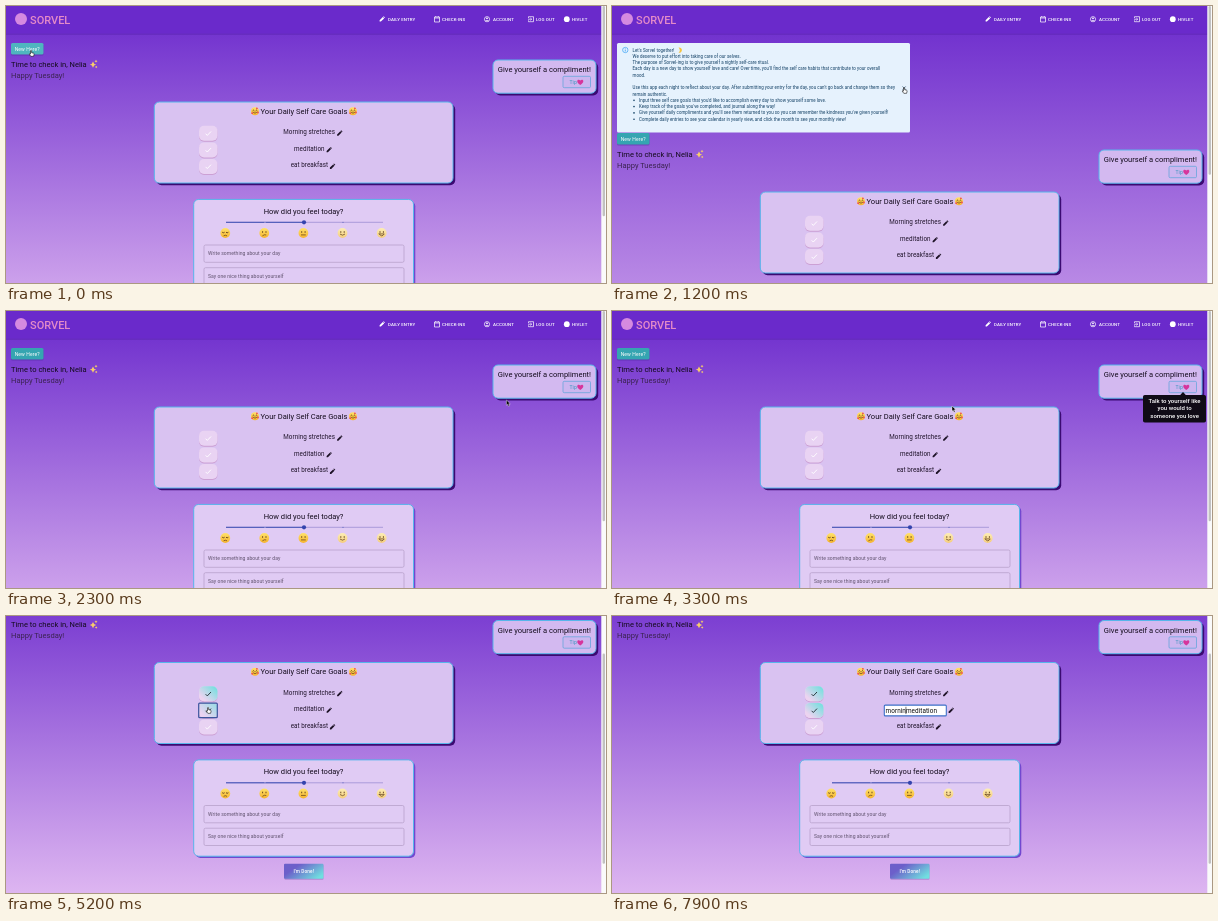
Recreate the animation shown at these times as an HTML page. Size 600x277 px, loop 8000 ms.

```html
<!DOCTYPE html>
<html lang="en">
<head>
<meta charset="utf-8">
<title>Self care check-in</title>
<style>
  html, body { margin: 0; width: 100%; height: 100%; overflow: hidden; background: #8a48d6; }
  svg { display: block; width: 100vw; height: 100vh; font-family: Roboto, Arial, sans-serif; }
</style>
</head>
<body>
<svg id="stage" viewBox="0 0 600 277"></svg>
<script>
const LOOP = 8000, PUSH = 90, SCROLL = 49.5, PAGE = 365;

// ---------- drawing helpers ----------
const text = (x, y, s, size, fill = '#17101f', more = '') =>
  `<text x="${x}" y="${y}" font-size="${size}" fill="${fill}" ${more}>${s}</text>`;
const rect = (x, y, w, h, r, fill, more = '') =>
  `<rect x="${x}" y="${y}" width="${w}" height="${h}" rx="${r}" fill="${fill}" ${more}/>`;
const circle = (x, y, r, fill, more = '') =>
  `<circle cx="${x}" cy="${y}" r="${r}" fill="${fill}" ${more}/>`;
const line = (d, color, width = .7, more = '') =>
  `<path d="${d}" fill="none" stroke="${color}" stroke-width="${width}" ${more}/>`;
const group = (id, body, x = 0, y = 0) =>
  `<g ${id ? `id="${id}"` : ''} transform="translate(${x} ${y})">${body}</g>`;
const at = (x, y, body) => group('', body, x, y);
const gradient = (id, from, to, dir) =>
  `<linearGradient id="${id}" ${dir}><stop stop-color="${from}"/><stop offset="1" stop-color="${to}"/></linearGradient>`;
const card = (x, y, w, h, fill, shadow, d) =>
  rect(x + d, y + d, w, h, 5, shadow) +
  rect(x, y, w, h, 5, fill, 'stroke="#57b5ea" stroke-width="1"');

const middle = 'text-anchor="middle"', medium = 'font-weight="500"';
const caps = 'font-weight="500" letter-spacing=".12"';
const pencil = color =>
  `<path d="M-2.400 2.400v-1.300l3.200-3.200 1.300 1.300-3.200 3.200zM1.100-2.400l.6-.6 1.300 1.300-.6.6z" fill="${color}"/>`;
const heart = '<path d="M0 2.800C-5.500-1-2.300-4-0-1.800 2.300-4 5.500-1 0 2.800z" fill="#d6359c"/>';
const spark = (x, y, r) =>
  `<path d="M${x} ${y - r}q${r * .2} ${r * .8} ${r} ${r}q${-r * .8} ${r * .2} ${-r} ${r}q${-r * .2} ${-r * .8} ${-r} ${-r}q${r * .8} ${-r * .2} ${r} ${-r}z" fill="#f8cd6a"/>`;

const ink = '#5b3a18';
const face = (x, y, r, eyes, mouth, skin = 'skin') => at(x, y,
  circle(0, 0, r, `url(#${skin})`) + line(eyes, ink, .9, 'stroke-linecap="round"') +
  line(mouth, ink, .7, 'stroke-linecap="round"'));
const dots = 'M-1.700-1.400v.8M1.700-1.400v.8';
const shut = 'M-2.800-.5q.9.800 1.800 0M1-.5q.9.800 1.800 0';
const love = (x, y) => face(x, y, 4, 'M-2.200-.6q.7-1.200 1.400 0M.8-.6q.7-1.200 1.400 0', 'M-1.600 1.300q1.600 1.600 3.200 0') +
  [[-2.8, 2], [2.9, 1.2], [1.9, -2.9]].map(([a, b]) => circle(x + a, y + b, .9, '#ee4c55')).join('');

// ---------- page parts ----------
const nav = rect(0, 27, 596, 2, 0, '#4b1a9c', 'opacity=".3"') + rect(0, 0, 596, 27.5, 0, '#6a2acb') +
  circle(15, 13, 6, '#d58ae0') + text(24, 17.5, 'SORVEL', 11, '#e58bc8', medium) +
  [[382, 'DAILY ENTRY'], [436, 'CHECK-INS'], [487, 'ACCOUNT'], [530, 'LOG OUT'], [566, 'HIVLET']]
    .map(([x, s]) => text(x, 14.7, s, 4.4, '#fff', caps)).join('') +
  at(376, 13.2, pencil('#fff')) +
  line('M428.500 11h5v5h-5zM428.500 12h5M429.700 10v1M432.300 10v1', '#fff') +
  circle(481, 13.2, 2.6, 'none', 'stroke="#fff" stroke-width=".7"') + circle(481, 12.3, .9, '#fff') +
  line('M479.300 15q1.700-1.400 3.400 0', '#fff') +
  line('M522.500 12v-1.300h5v5h-5v-1.300M522 13.200h3.600M524.400 12l1.300 1.200-1.300 1.200', '#fff') +
  circle(560.8, 13.2, 2.9, '#fff');

const notes = [
  "Let's Sorvel together!",
  'We deserve to put effort into taking care of our selves.',
  'The purpose of Sorvel-ing is to give yourself a nightly self-care ritual.',
  'Each day is a new day to show yourself love and care! Over time, you\'ll find the self care habits that contribute to your overall',
  'mood.', '',
  "Use this app each night to reflect about your day. After submitting your entry for the day, you can't go back and change them so they",
  'remain authentic.',
  "• Input three self care goals that you'd like to accomplish every day to show yourself some love.",
  "• Keep track of the goals you've completed, and journal along the way!",
  "• Give yourself daily compliments and you'll see them returned to you so you can remember the kindness you've given yourself!",
  '• Complete daily entries to see your calendar in yearly view, and click the month to see your monthly view!'
];
const noteLine = (s, i) => {
  const y = 45.6 + i * 6.28;
  return s[0] === '•'
    ? circle(22, y - 1.5, .8, '#0d3c61') + text(27, y, s.slice(2), 4.41, '#0d3c61', 'letter-spacing=".047"')
    : text(20.5, y, s, 4.41, '#0d3c61', 'letter-spacing=".047"');
};
const alertBox = rect(5, 37, 293, 89.5, 1.5, '#e6f2fd') + notes.map(noteLine).join('') +
  circle(13.3, 44, 2.7, 'none', 'stroke="#2196f3" stroke-width=".6"') +
  line('M13.300 43.500v2M13.300 42.300v.6', '#2196f3') +
  '<path d="M66.500 41.500a2.700 2.700 0 1 1 0 5.200q2.700-2 0-5.200z" fill="#f5c443"/>' +
  line('M290.600 80.500l3 3m0-3l-3 3', '#0d3c61');

const rows = [[277.3, 333.5, 'Morning stretches'], [288, 323, 'meditation'], [284.7, 326.3, 'eat breakfast']];
const goalRow = ([x, px, s], i) => {
  const y = 127.3 + i * 16.6;
  return rect(193, y - 6.5, 18.5, 15, 5, '#b5629f', 'opacity=".35"') +
    rect(193, y - 7.5, 18.5, 15, 5, '#e9d3f3', `id="box${i}"`) +
    rect(193, y - 7.5, 18.5, 15, 5, 'url(#done)', `id="fill${i}"`) +
    line(`M199.600 ${y + .4}l1.700 1.700 3.700-3.900`, '#fff', .9, `id="tick${i}"`) +
    group('row' + i, text(x, y + .8, s, 6.3, '#21152c', 'letter-spacing=".047"') + at(px, y, pencil('#1d1226')));
};

const field = (y, s) => rect(198, y, 200, 17.3, 1.5, 'none', 'stroke="#b39dc6" stroke-width=".7"') +
  text(202, y + 10.2, s, 5.04, '#5f516d', 'letter-spacing=".047"');

const content =
  rect(5, 38, 32.5, 11.5, 1.5, '#42208c', 'opacity=".4"') +
  rect(5, 37, 32.5, 11.5, 1.5, '#35a5b1', 'id="help"') +
  text(21.2, 44.6, 'New Here?', 5, '#fff', middle + ' letter-spacing=".1"') +
  text(5, 60.5, 'Time to check in, Nelia', 7.55, '#130b1c') + spark(87, 58.6, 3.2) + spark(90, 55.3, 1.5) + spark(90.2, 61, 1.3) +
  text(5, 71.7, 'Happy Tuesday!', 7.55, '#3b2351') +

  card(487, 54, 103, 33.2, '#d3b9f0', '#3b0a72', 2.2) +
  text(585, 66, 'Give yourself a compliment!', 7.55, '#130b1c', 'text-anchor="end"') +
  rect(557, 70.3, 27.5, 11.4, 1.2, '#ccb6ef', 'id="tip" stroke="#5aa4d8" stroke-width=".7"') +
  text(563.5, 77.8, 'Tip', 5.04, '#3a94bd', 'letter-spacing=".1"') + at(574.3, 76.2, heart) +

  card(148.3, 96, 298.7, 81, '#d9c2f1', '#3b0a72', 2.2) +
  love(249, 105.2) + love(347, 105.2) +
  text(298, 107.6, 'Your Daily Self Care Goals', 7.55, '#130b1c', middle) + rows.map(goalRow).join('') +
  rect(192.7, 136.6, 18.6, 14.6, 1, 'none', 'id="focus" stroke="#3b559c" stroke-width="1.2"') +
  group('edit', rect(272.3, 138.6, 62, 10.8, 1, '#fff', 'stroke="#3d6fc8" stroke-width="1.1"') +
    '<text y="146.200" x="273.600" font-size="6.400" fill="#111" letter-spacing=".05"><tspan id="typed"></tspan><tspan>meditation</tspan></text>' +
    line('M0 140.300v7.300', '#111', .6, 'id="caret"') + at(339, 144, pencil('#1d1226'))) +

  card(187.7, 193.4, 219.8, 96.3, '#e0cbf4', '#7248cf', 1.8) +
  text(297.5, 207.5, 'How did you feel today?', 7.55, '#130b1c', middle) +
  line('M220 216.300H377', '#9d8fd4', .8) + line('M220 216.300H298', '#3f51b5', 1) +
  circle(259, 216.3, .5, '#dfcaf4') + circle(337, 216.3, .5, '#3f51b5') + circle(298, 216.3, 2.1, '#3444ad') +
  face(219.3, 227, 4.9, shut, 'M-1.400 2.600q1.400-1 2.800 0') +
  face(258.3, 227, 4.9, dots, 'M-1.600 2.600q1.600-1.400 3.200-.8') +
  face(297.4, 227, 4.9, dots, 'M-2 1.900h4') +
  face(336.5, 227, 4.9, dots, 'M-2.200 1.300q2.200 2 4.400 0', 'pale') +
  face(375.7, 227, 4.9, dots, 'M-2.500.9h5q-2.500 4-5 0', 'pale') +
  field(239, 'Write something about your day') + field(261.7, 'Say one nice thing about yourself') +
  rect(278.5, 298.3, 39, 15, 1, '#55308f', 'opacity=".3"') + rect(278, 297.3, 39.5, 15, 1, 'url(#send)') +
  text(297.8, 306.6, "I'm Done!", 4.75, '#fff', middle + ' font-weight="500" letter-spacing=".1"');

const tooltip = rect(531, 84, 63, 27.5, 1.8, '#100b16') + '<path d="M568 84.200l3-3.200 3 3.200z" fill="#100b16"/>' +
  ['Talk to yourself like', 'you would to', 'someone you love'].map((s, i) =>
    text(562.6, 91.7 + i * 7.4, s, 6, '#fff', middle + ' ' + medium)).join('');

const arrow = '<path id="arrow" d="M0 0v5.200l1.200-1 .9 2 1-.5-.9-1.900h1.600z" fill="#000" stroke="#fff" stroke-width=".4"/>';
const hand = '<path id="hand" d="M-.5-2.300q.6-.7 1.100 0v2l2 .5q.7.300.5 1l-.5 2.100h-2.800l-1.700-2.300q.2-.8 1.400.1z" fill="#fff" stroke="#111" stroke-width=".6"/>';

const svg = document.getElementById('stage');
svg.innerHTML = '<defs>' +
  gradient('sky', '#6a29cc', '#ebc6f5', 'x2="0" y2="1"') +
  gradient('done', '#ecd3f0', '#6fe0de', 'x1=".2" y1=".8" y2=".1"') +
  gradient('send', '#6c5fca', '#70dfe0', 'x1=".25" y1=".3" y2=".7"') +
  gradient('skin', '#ffe26a', '#f6b42f', 'x2="0" y2="1"') +
  gradient('pale', '#fdeeb4', '#f5cd7c', 'x2="0" y2="1"') +
  '<clipPath id="cut"><rect id="window" y="37" width="600"/></clipPath></defs>' +
  rect(0, 0, 600, PAGE, 0, 'url(#sky)', 'id="back"') +
  group('page', `<g clip-path="url(#cut)">${alertBox}</g>` + group('body', content) + nav) +
  group('tooltip', tooltip) +
  rect(595.3, 0, 4.7, 277, 0, '#fafafa') + rect(596.6, 0, 2.4, 210, 1.2, '#c1c1c1', 'id="thumb"') +
  group('cursor', arrow + hand);

// ---------- motion ----------
const $ = Object.fromEntries([...svg.querySelectorAll('[id]')].map(e => [e.id, e]));
const clamp = v => Math.max(0, Math.min(1, v));
const ease = v => v * v * (3 - 2 * v);
const ramp = (t, a, b) => ease(clamp((t - a) / (b - a)));
const move = (el, x, y) => el.setAttribute('transform', `translate(${x} ${y})`);
const set = (el, props) => { for (const k in props) el.setAttribute(k, props[k]); };
const show = (el, on) => el.setAttribute('opacity', +on);

// time, x, y
const path = [
  [0, 25, 47], [450, 25, 47], [1100, 292, 84], [1500, 292, 84], [2000, 408, 105],
  [2550, 570, 77], [3050, 570, 77], [3300, 340, 95], [3650, 300, 95], [4050, 201, 76],
  [4500, 201, 76], [4900, 202, 94], [5500, 202, 94], [6150, 295, 113], [6300, 295, 113],
  [6650, 323, 94], [6950, 323, 94]
];
function pointer(t) {
  const i = path.findIndex(p => p[0] > t);
  if (i < 0) return path[path.length - 1].slice(1);
  const [t0, x0, y0] = path[i - 1], [t1, x1, y1] = path[i], k = ramp(t, t0, t1);
  return [x0 + (x1 - x0) * k, y0 + (y1 - y0) * k];
}

function draw(t) {
  const push = PUSH * (ramp(t, 200, 500) - ramp(t, 1350, 1650));
  const scroll = SCROLL * ramp(t, 3400, 3620);
  const height = PAGE + push;
  set($.back, { y: -scroll, height });
  set($.window, { height: push });
  set($.thumb, { y: scroll * 277 / height, height: 277 * 277 / height });
  move($.page, 0, -scroll);
  move($.body, 0, push);
  $.help.setAttribute('fill', t < 450 ? '#4fb5bf' : '#35a5b1');

  const tip = t >= 2500 && t < 3150;
  $.tip.setAttribute('fill', tip ? '#c3b0ec' : '#ccb6ef');
  show($.tooltip, ramp(t, 2500, 2650) - ramp(t, 3310, 3400));

  [4300, 5100, Infinity].forEach((time, i) => {
    const done = t >= time;
    show($['fill' + i], done ? clamp((t - time) / 150) : 0);
    $['tick' + i].setAttribute('stroke', done ? '#1c2a2e' : '#fff');
  });
  $.box0.setAttribute('fill', t > 4000 && t < 4600 ? '#bfa8da' : '#e9d3f3');
  show($.focus, t >= 5100 && t < 6750);

  const editing = t >= 6750;
  show($.edit, editing);
  show($.row1, !editing);
  if (editing) {
    $.typed.textContent = 'mornin'.slice(0, Math.max(0, Math.floor((t - 7200) / 100)));
    move($.caret, 273.6 + $.typed.getComputedTextLength(), 0);
  }

  const [x, y] = pointer(t);
  move($.cursor, x, y);
  show($.cursor, t < 7250);
  const link = t < 500 || t > 1050 && t < 1530 || t > 2480 && t < 3080 ||
    t > 4000 && t < 5560 || t > 6600;
  show($.hand, link);
  show($.arrow, !link);
}

function frame() {
  draw(performance.now() % LOOP);
  requestAnimationFrame(frame);
}
frame();
</script>
</body>
</html>
```
